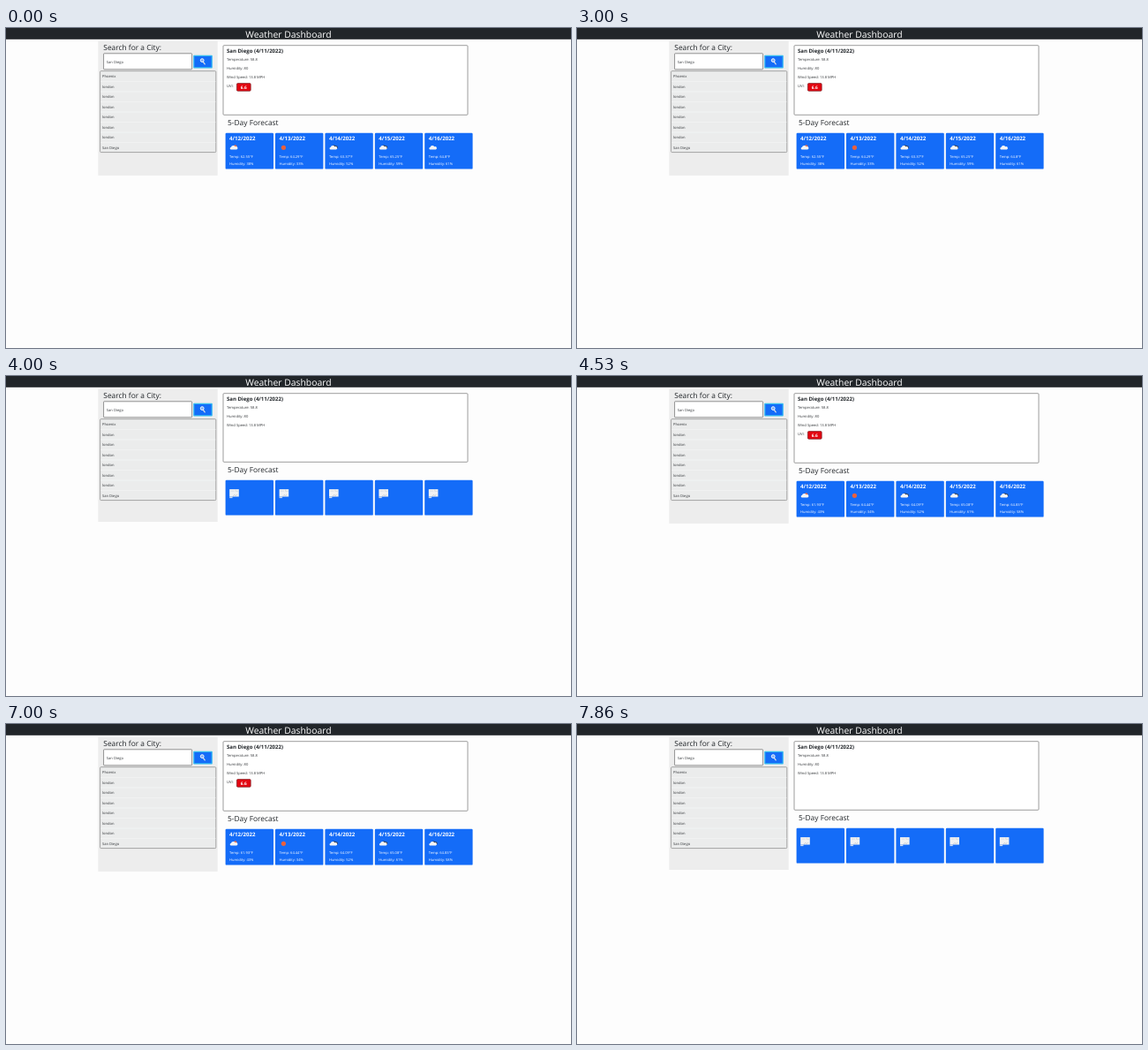
These frames come from a looping animation (640 px wide and 362 px high, 8 s). An HTML page:

```html
<!DOCTYPE html>
<html lang="en">
<head>
<meta charset="utf-8">
<title>Weather Dashboard</title>
<style>
  html, body { margin: 0; width: 100%; height: 100%; overflow: hidden; background: #fdfdfd; }
  svg { display: block; width: 100vw; height: 100vh; }
  text { font-family: "Open Sans", "Noto Sans", sans-serif; font-size: 4.1px; fill: #34373a; text-rendering: geometricPrecision; }
  .title { font-size: 10.4px; fill: #fff; text-anchor: middle; }
  .head { font-size: 8.4px; fill: #212529; }
  .bold { font-size: 6px; font-weight: 700; fill: #212529; }
  .card text { fill: #fff; font-size: 4.05px; }
  .card .bold { font-size: 6.1px; }
</style>
</head>
<body>
<svg id="stage" viewBox="0 0 640 362" preserveAspectRatio="none"></svg>
<script>
const LOOP = 8000;
const stage = document.getElementById('stage');

const rect = (x, y, w, h, fill, extra = '') =>
  `<rect x="${x}" y="${y}" width="${w}" height="${h}" fill="${fill}" ${extra}/>`;
const text = (x, y, s, cls = '') => `<text x="${x}" y="${y}" class="${cls}">${s}</text>`;
const border = (color, width, r) => `stroke="${color}" stroke-width="${width}" rx="${r}"`;

const history = ['Phoenix', ...Array(6).fill('london'), 'San Diego'];
const before = [['62.55', 38], ['64.29', 33], ['63.37', 52], ['65.25', 59], ['64.8', 61]];
const after = [['61.93', 43], ['64.44', 34], ['64.09', 52], ['65.08', 61], ['64.83', 58]];

const cloud = 'M-3.3 2.3a1.5 1.5 0 0 1 .3-2.9a2.5 2.5 0 0 1 4.6-.5a1.8 1.8 0 0 1 1.7 3.4z';

function icon(day, dark) {
  if (day === 1) return '<circle cx="9.4" cy="16.5" r="2.6" fill="#e8603f"/>';
  const back = day === 0
    ? '<circle cx="1.7" cy="-1.1" r="1.9" fill="#e8704f"/>'
    : dark ? `<path d="${cloud}" transform="translate(1.3 -.8) scale(.85)" fill="#3a3f4a"/>` : '';
  return `<g transform="translate(9.4 16.5)">${back}<path d="${cloud}" fill="#f4f4f6"/></g>`;
}

// Placeholder shown while the weather picture is missing
const brokenImage =
  rect(4.6, 10.3, 10.6, 8.4, '#f1f2f3') + rect(4.6, 18.7, 3.3, 1.6, '#c9d8f2') +
  '<path d="M8 18.7l2-2 1.6 1 1.6-1.2" stroke="#b9bfc4" stroke-width=".7" fill="none"/>' +
  '<path d="M6 12.3h4M11.5 10.5v2h3.4" stroke="#c9cdd0" stroke-width=".6" fill="none"/>';

function card(day, data, top) {
  const body = data
    ? text(4.5, 7.9, `4/${12 + day}/2022`, 'bold') +
      icon(day, day < 4 || data === after) +
      text(4.5, 27.8, `Temp: ${data[day][0]}°F`) +
      text(4.5, 36.7, `Humidity: ${data[day][1]}%`)
    : brokenImage;
  return `<g class="card" transform="translate(${248.6 + day * 56.4} ${top})">` +
    rect(0, 0, 54.4, data ? 40.8 : 39.8, '#146cf8', 'rx="1.2"') + body + '</g>';
}

function searchPanel(bottom) {
  const rows = history.map((name, i) =>
    (i ? rect(107, 48.7 + i * 11.5, 130.5, .6, '#f6f7f7') : '') +
    text(109, 56.1 + i * 11.5, name)).join('');
  return rect(104.3, 15, 135.4, bottom - 15, '#ededed') +
    text(110.3, 25, 'Search for a City:', 'head') +
    rect(110.6, 28.8, 100, 18, '#fff', border('#777', .8, .6)) +
    text(113.8, 39.6, 'San Diego') +
    rect(212.8, 31.3, 20.4, 13.6, '#146cf8', border('#35bdf0', 1.2, .3)) +
    '<path d="M223.2 38.2l2 2.7" stroke="#d8dde5" stroke-width="1.3" stroke-linecap="round"/>' +
    '<circle cx="222.2" cy="36.6" r="1.9" fill="#7fa9ee" stroke="#fff" stroke-width=".9"/>' +
    rect(106.6, 48.7, 131.2, 91.9, '#ebecec', border('#919191', .8, 1)) + rows;
}

function resultPanel(data, shift) {
  return rect(246, 19.7, 277, 78.6 + shift, '#fff', border('#858585', .8, 1)) +
    text(250, 27.6, 'San Diego (4/11/2022)', 'bold') +
    text(250, 36.8, 'Temperature: 58.8') +
    text(250, 47, 'Humidity: 80') +
    text(250, 57.1, 'Wind Speed: 13.8 MPH') +
    (data ? text(250, 67.4, 'UVI:') +
      rect(261.4, 62.6, 15.8, 8.7, '#e30610', border('#7c2328', .7, 1.2)) +
      '<text x="269.3" y="68.8" text-anchor="middle" style="fill:#fff;font-size:4.8px;font-weight:700">6.6</text>' : '') +
    text(251, 109.7 + shift, '5-Day Forecast', 'head');
}

const cursor = '<path d="M143.6 -1.2v5l1.1-1 .8 1.8.8-.4-.8-1.6h1.5z" fill="#fff" stroke="#111" stroke-width=".3"/>';

function draw(t) {
  const loading = (t >= 3660 && t < 4530) || t >= 7730;
  const data = loading ? null : t < 3660 ? before : after;
  const shift = loading ? -1 : 0;
  stage.innerHTML =
    rect(0, 0, 640, 362, '#fdfdfd') +
    rect(0, 0, 640, 12.8, '#212529') +
    text(320, 10.8, 'Weather Dashboard', 'title') +
    searchPanel(loading ? 165 : 166.8) +
    resultPanel(data, shift) +
    before.map((_, day) => card(day, data, 118.8 + shift)).join('') +
    (t >= 1130 && t < 3000 ? cursor : '');
}

const start = performance.now();
function tick() {
  draw((performance.now() - start) % LOOP);
  requestAnimationFrame(tick);
}
tick();
</script>
</body>
</html>
```
